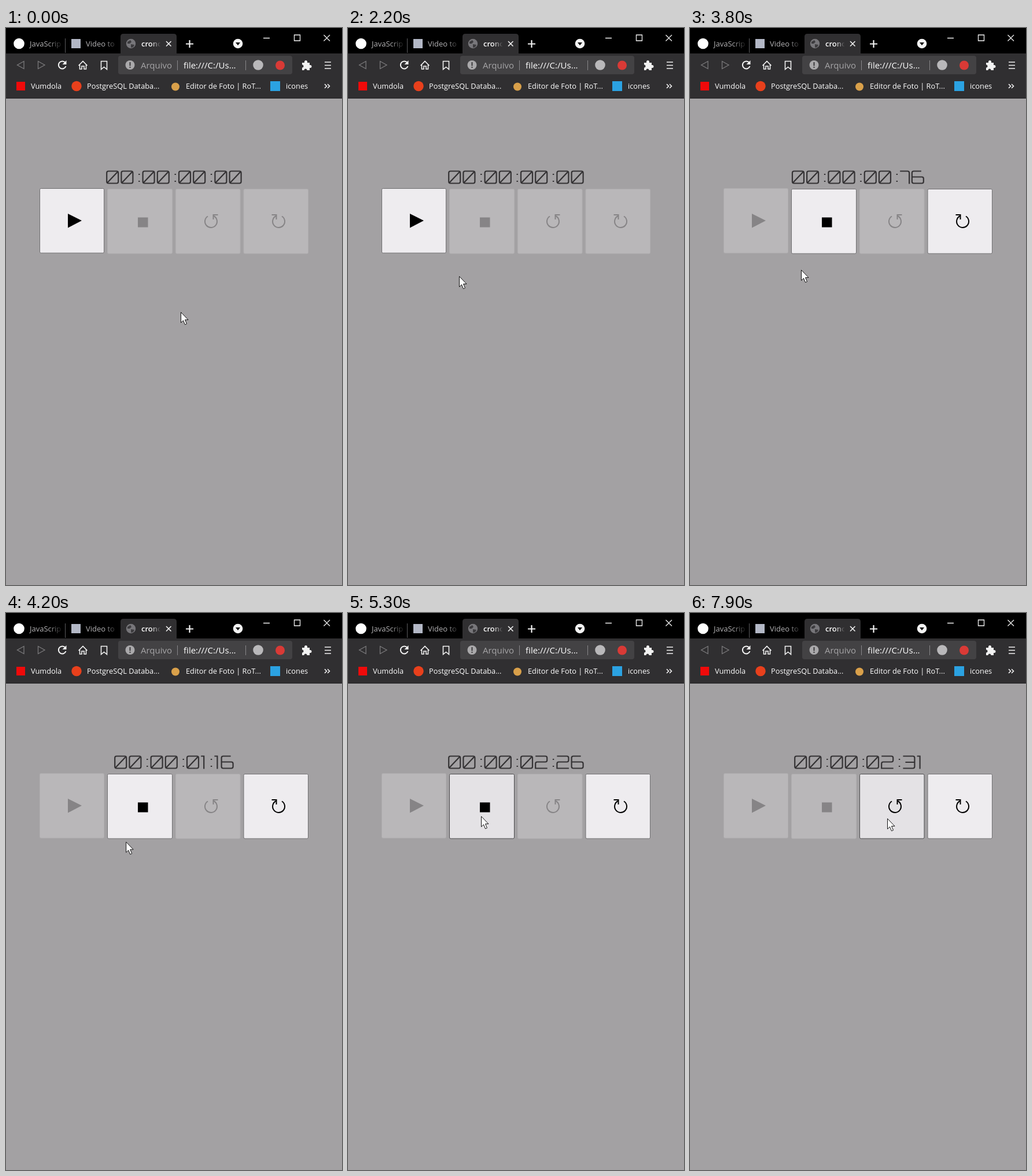
Animation, 581 px wide and 963 px high, one loop 8000 ms. Source, as an HTML page:

```html
<!DOCTYPE html>
<html lang="pt">
<head>
<meta charset="utf-8">
<title>crono</title>
<style>
  html, body { margin: 0; width: 100%; height: 100%; overflow: hidden; background: #a3a1a3; }
  svg { display: block; }
  text { font: 12.8px "Open Sans", "Noto Sans", sans-serif; fill: #fff; }
  .tab { font-size: 13px; fill: #b4b3b5; }
  .url { font-size: 15px; }
  .line { fill: none; stroke: #f2f2f2; stroke-width: 1.6; }
  .button rect { fill: #b9b7b9; stroke: #b0aeb0; }
  .button .icon { fill: #868486; }
  .button .arc { fill: none; stroke: #868486; stroke-width: 2; }
  .on rect { fill: #eeecef; stroke: #717072; }
  .on .icon { fill: #000; }
  .on .arc { stroke: #000; }
  .hover rect { fill: #e4e2e5; stroke: #4b4a4c; }
  #clock { fill: none; stroke: #343234; stroke-width: 2.2; }
</style>
</head>
<body>
<svg width="581" height="963" viewBox="0 0 581 963">
  <defs>
    <linearGradient id="fadeTab"><stop stop-color="#000" stop-opacity="0"/><stop offset="1"/></linearGradient>
    <linearGradient id="fadeActive"><stop stop-color="#302f31" stop-opacity="0"/><stop offset=".8" stop-color="#302f31"/></linearGradient>
  </defs>
  <rect width="581" height="963" fill="#a3a1a3"/>

  <!-- tab strip -->
  <rect width="581" height="45" fill="#000"/>
  <rect y="44" width="581" height="78" fill="#302f31"/>
  <path d="M0 121.5H581" stroke="#242325"/>
  <path d="M198 44V15q0-5 5-5H290q5 0 5 5V44Z" fill="#302f31"/>
  <circle cx="22.5" cy="27" r="9.3" fill="#fff"/>
  <text class="tab" x="41" y="32">JavaScrip</text>
  <rect x="74" y="15" width="25" height="25" fill="url(#fadeTab)"/>
  <path d="M102.5 18V43" stroke="#5b5a5c"/>
  <rect x="113" y="19" width="16" height="16" fill="#b3b8c6"/>
  <text class="tab" x="138" y="32">Video to</text>
  <rect x="170" y="15" width="24" height="25" fill="url(#fadeTab)"/>
  <circle cx="216" cy="27" r="8.2" fill="#77767a"/>
  <path d="M210 24l5-3 2 3-3 3h-4zM216 28l6 1-2 4-4 1z" fill="#3c3b3e"/>
  <text class="tab" x="234" y="32" style="font-weight:600;fill:#fff">crono</text>
  <rect x="250" y="15" width="22" height="25" fill="url(#fadeActive)"/>
  <path class="line" d="M277 23l8.500 8.500M285.500 23l-8.500 8.500" stroke-width="2"/>
  <path class="line" d="M311 27.500H324M317.500 21V34" style="stroke-width:2.200"/>
  <circle cx="401" cy="27" r="8.300" fill="#f4f4f4"/>
  <path d="M397 25h8l-4 5z" fill="#000"/>
  <path class="line" d="M445 17.500H456M498.500 12H508.500V22H498.500ZM549.500 12L560 22.500M560 12L549.500 22.500" style="stroke-width:1.300"/>

  <!-- toolbar -->
  <rect x="194" y="48" width="301" height="32" rx="4" fill="#434244"/>
  <path class="line" d="M31 57.500V70.500L19.500 64ZM55.500 57.500V70.500L67 64Z" style="stroke:#7b7a7c;stroke-width:1.300"/>
  <path class="line" d="M102.500 60A6.500 6.500 0 1 0 103.500 66" style="stroke-width:2"/>
  <path d="M104.500 56v7h-7z" fill="#f2f2f2"/>
  <path class="line" d="M125.500 65L133 57.500 140.500 65M127.500 63.500V71H131V66H135V71H138.500V63.500"/>
  <path class="line" d="M164.500 57.500H174.500V71.500L169.500 67.500 164.500 71.500Z"/>
  <circle cx="214.500" cy="64" r="8" fill="#aaa9ab"/>
  <path d="M214.500 59V65.500M214.500 67V69" stroke="#39383a" stroke-width="2"/>
  <text class="url" x="233" y="70" style="fill:#a5a4a6">Arquivo</text>
  <path d="M296.500 56V73M414.500 56V73" stroke="#88878a"/>
  <text class="url" x="307" y="70">file:///C:/Us...</text>
  <circle cx="436" cy="64" r="8.800" fill="#b9b8ba"/>
  <circle cx="474" cy="64.500" r="8" fill="#d93a36"/>
  <path d="M512 60H516V58.500a2.500 2.500 0 0 1 5 0V60H525V64H526a2.500 2.500 0 0 1 0 5H525V73H520.500a2.500 2.500 0 0 0-5 0H512V68.500a2.500 2.500 0 0 0 0-5Z" fill="#f2f2f2"/>
  <path class="line" d="M551 59H562M551 64.500H562M551 70H562"/>

  <!-- bookmarks -->
  <rect x="18" y="93" width="15" height="15" fill="#f00a0a"/>
  <text x="43" y="105">Vumdola</text>
  <circle cx="122" cy="100.500" r="8.700" fill="#e8401c"/>
  <text x="140" y="105">PostgreSQL Databa...</text>
  <circle cx="293" cy="101.500" r="7" fill="#d9a04a"/>
  <text x="311" y="105">Editor de Foto | RoT...</text>
  <rect x="457" y="92" width="17" height="17" fill="#2ba2e2"/>
  <text x="484" y="105">icones</text>
  <path class="line" d="M551 97l3.500 3.500-3.500 3.500M556 97l3.500 3.500-3.500 3.500"/>

  <!-- stopwatch -->
  <path id="clock"/>
  <g class="button"><rect x="58.500" y="277.500" width="111" height="111.500" rx="2"/><path class="icon" d="M107 321L131 333 107 345.500Z"/></g>
  <g class="button"><rect x="175.500" y="278.500" width="112" height="111.500" rx="2"/><path class="icon" d="M228 327.500H245.500V344.500H228Z"/></g>
  <g class="button"><rect x="293.500" y="278.500" width="111.500" height="111.500" rx="2"/><path class="arc" d="M349 325.500A10.500 10.500 0 1 0 359 325M366.500 323H358.500V331"/></g>
  <g class="button"><rect x="411" y="278.500" width="111.500" height="111.500" rx="2"/><path class="arc" d="M477 325.500A10.500 10.500 0 1 1 467 325M459.500 323H467.500V331"/></g>
  <path id="cursor" d="M.5.5V18.500L4.500 14.700 7.500 21.800 10.500 20.500 7.500 13.500H13Z" fill="#fff" stroke="#111"/>
</svg>
<script>
const LOOP = 8000, TICK = 100, START = 3040, STOP = 5350;

// Stroke path of each digit in a 22 x 23 cell; advance is 25.2 unless listed.
const GLYPHS = [
  'M4 1H18q3 0 3 3V19q0 3-3 3H4q-3 0-3-3V4q0-3 3-3ZM2.500 20.500L19.500 2.500',
  'M0 1H5V23',
  'M1 1H18q3 0 3 3V8q0 3-3 3H4q-3 0-3 3V22H21.500',
  'M1 1H18q3 0 3 3V19q0 3-3 3H1M5 11.500H21',
  'M1 0V11q0 3 3 3H21.500M16.500 6V23',
  'M21 1H1V11H18q3 0 3 3V19q0 3-3 3H1',
  'M17 1H4q-3 0-3 3V19q0 3 3 3H18q3 0 3-3V14q0-3-3-3H1',
  'M0 1H13q3 0 3 3V23',
  'M4 1H18q3 0 3 3V19q0 3-3 3H4q-3 0-3-3V4q0-3 3-3ZM1 11.500H21',
  'M5 22H18q3 0 3-3V4q0-3-3-3H4q-3 0-3 3V8q0 3 3 3H21'
];
const COLON = 'M5.500 6.500h2.400M5.500 18.500h2.400';
const ADVANCE = { ':': 12, 1: 11.2, 7: 19.7 };

// Pointer tip: time, x, y
const PATH = [
  [0, 302, 491], [1300, 302, 491], [1800, 234, 464], [2200, 192, 429],
  [2700, 118, 350], [3100, 113, 345], [3300, 118, 350], [3600, 180, 409],
  [3800, 192, 418], [4000, 196, 423], [4500, 224, 354], [4700, 224, 352],
  [5400, 231, 351], [5600, 231, 351], [6000, 233, 390], [7400, 233, 390],
  [7800, 338, 357], [7900, 341, 355], [8000, 341, 355]
];

const clock = document.getElementById('clock');
const cursor = document.getElementById('cursor');
const buttons = [...document.querySelectorAll('.button')];
const advance = c => ADVANCE[c] || 25.2;

function pointerAt(t) {
  const i = PATH.findIndex(p => p[0] > t);
  const [t0, x0, y0] = PATH[i - 1], [t1, x1, y1] = PATH[i];
  const k = (t - t0) / (t1 - t0);
  return [x0 + (x1 - x0) * k, y0 + (y1 - y0) * k];
}

function timeText(hundredths) {
  const s = Math.floor(hundredths / 100);
  return [s / 3600, s / 60 % 60, s % 60, hundredths % 100]
    .map(n => String(Math.floor(n)).padStart(2, '0')).join(':');
}

function clockPath(text) {
  const chars = [...text];
  let x = 290.5 - chars.reduce((sum, c) => sum + advance(c), 0) / 2;
  return chars.map(c => {
    // The zero-length relative move anchors a glyph made of absolute coordinates.
    const d = shift(c === ':' ? COLON : GLYPHS[c], x + 1.5, 246.5);
    x += advance(c);
    return d;
  }).join('');
}

// Translates the absolute commands M, L, H and V of a path.
function shift(d, dx, dy) {
  return d.replace(/([MLHV])([\d.]+)(?: ([\d.]+))?/g, (_, op, a, b) =>
    op === 'H' ? op + (+a + dx) :
    op === 'V' ? op + (+a + dy) :
    `${op}${+a + dx} ${+b + dy}`);
}

function draw(now) {
  const t = Math.floor(now % LOOP / TICK) * TICK;
  const [px, py] = pointerAt(t);
  const running = t >= START && t < STOP, stopped = t >= STOP;
  const enabled = [t < START, running, stopped, running || stopped];

  cursor.setAttribute('transform', `translate(${px} ${py})`);
  const elapsed = Math.max(0, Math.min(t, STOP) - START);
  clock.setAttribute('d', clockPath(timeText(Math.floor(elapsed / 10))));
  buttons.forEach((b, i) => {
    const { x, y, width, height } = b.firstChild.getBBox();
    const inside = px > x && px < x + width && py > y && py < y + height;
    b.classList.toggle('on', enabled[i]);
    b.classList.toggle('hover', enabled[i] && inside);
  });
  requestAnimationFrame(draw);
}
draw(performance.now());
</script>
</body>
</html>
```
